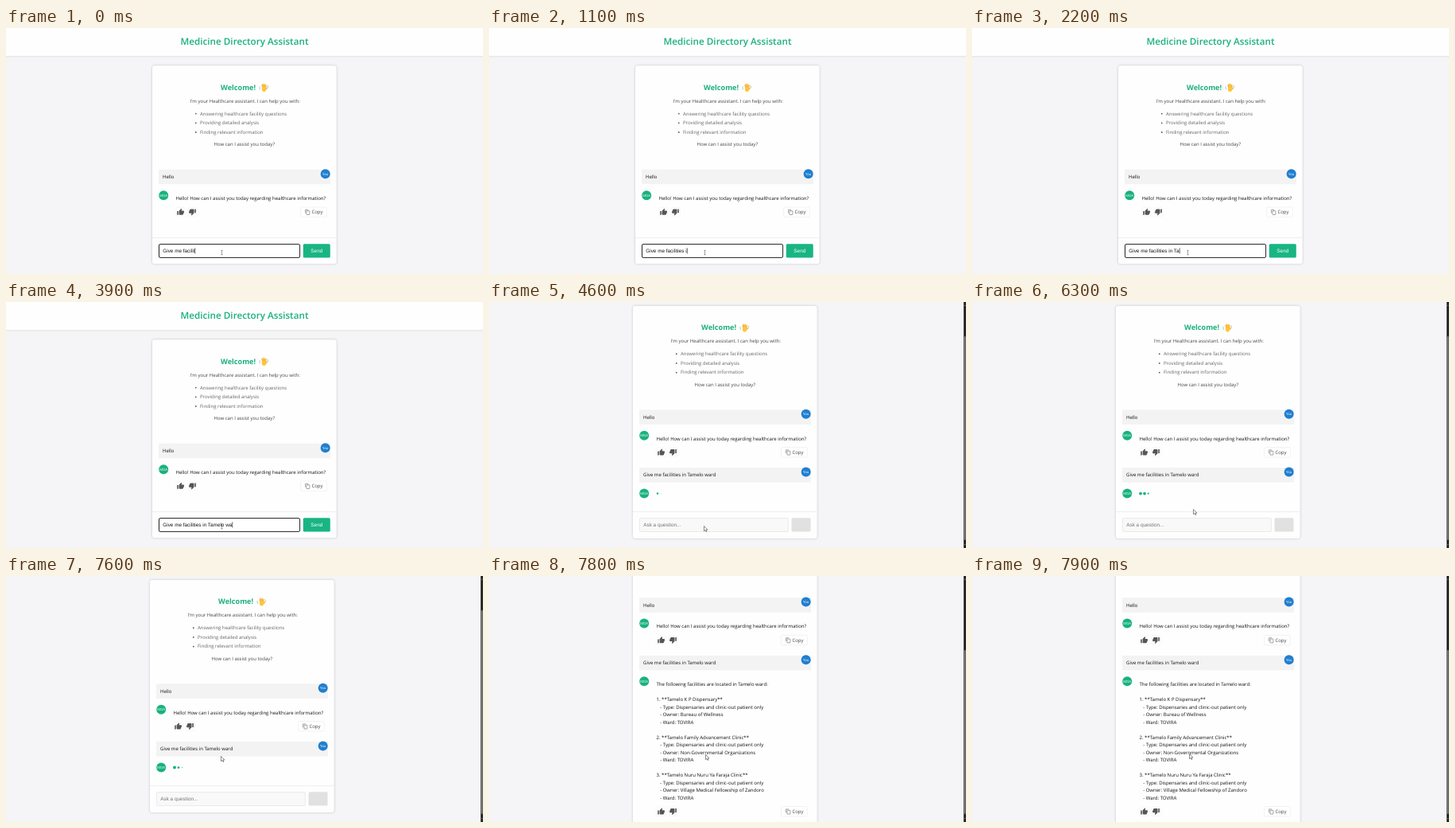
Animation of 600 by 309 pixels, one loop 8000 ms. Source, as an HTML page:

```html
<!DOCTYPE html>
<html lang="en">
<head>
<meta charset="utf-8">
<title>Chat assistant</title>
<style>
  html, body { margin: 0; width: 100%; height: 100%; overflow: hidden; background: #f5f4f6; }
  svg { display: block; width: 100vw; height: 100vh; }
  text { font: 6.03px "Open Sans", "Noto Sans", sans-serif; fill: #111; white-space: pre; text-rendering: geometricPrecision; }
  .mid { text-anchor: middle; }
  .title { font-size: 11.7px; font-weight: 600; fill: #1ab07c; }
  .welcome { font-size: 9.15px; font-weight: 700; fill: #1ab07c; }
  .soft { fill: #444; }
  .item { fill: #666; }
  .badge { font-size: 4.3px; fill: #fff; text-anchor: middle; }
  .form text { font: 6.38px "Liberation Sans", Arial, sans-serif; }
  .form .send { fill: #fff; text-anchor: middle; }
  .form .hint { fill: #757575; }
  .card { fill: #fefefe; filter: drop-shadow(0 .5px 1.5px #0003); }
</style>
</head>
<body>
<svg viewBox="0 0 600 309" preserveAspectRatio="none"></svg>
<script>
const LOOP = 8000, SENT = 4600, ANSWERED = 7700;
const question = "Give me facilities in Tamelo ward";
const typing = [[0, 15], [1000, 20], [1900, 22], [2200, 24], [3900, 31], [4300, 33]];
const pointerX = [[5500, 270.5], [6300, 278.5], [7200, 271], [7600, 270.5], [7900, 273.5]];
const pointerY = [[5500, 281.5], [6300, 260.5], [7200, 228], [7600, 226.5], [7900, 223.5]];

const clinic = (n, name, owner) =>
  ["", `${n}. **${name}**`, "   - Type: Dispensaries and clinic-out patient only", `   - Owner: ${owner}`, "   - Ward: TOVIRA"];
const answer = [
  "The following facilities are located in Tamelo ward:",
  ...clinic(1, "Tamelo K P Dispensary", "Bureau of Wellness"),
  ...clinic(2, "Tamelo Family Advancement Clinic", "Non-Governmental Organizations"),
  ...clinic(3, "Tamelo Nuru Nuru Ya Faraja Clinic", "Village Medical Fellowship of Zandoro")
];

const text = (x, y, s, cls = "") => `<text x="${x}" y="${y}" class="${cls}">${s}</text>`;
const rect = (x, y, w, h, fill, more = "") =>
  `<rect x="${x}" y="${y}" width="${w}" height="${h}" fill="${fill}" ${more}/>`;
const badge = (x, y, fill, s) => `<circle cx="${x}" cy="${y}" r="6" fill="${fill}"/>` + text(x, y + 1.6, s, "badge");
const userRow = (y, s) =>
  rect(192, y, 216, 18.5, "#f3f3f4") + text(197, y + 11.4, s) + badge(401.7, y + 5.4, "#1f7fcf", "You");
const bot = y => badge(198.2, y, "#18b27d", "MDA");
const thumb = `<path fill="#555" d="M1 21h4V9H1v12zm22-11c0-1.1-.9-2-2-2h-6.31l.95-4.57.03-.32c0-.41-.17-.79-.44-1.06L14.17 1 7.59 7.59C7.22 7.95 7 8.45 7 9v10c0 1.1.9 2 2 2h9c.83 0 1.54-.5 1.84-1.22l3.02-7.05c.09-.23.14-.47.14-.73v-2z"/>`;
const frame = (x, y) => rect(x, y, 11.4, 11.4, "none", 'rx="1.5" stroke="#f1f1f1" stroke-width=".6"');
const actions = y => `
  ${frame(214, y - 5.6)}${frame(229, y - 5.6)}
  <g transform="translate(214.8 ${y - 4.6}) scale(.4)">${thumb}</g>
  <g transform="translate(239.3 ${y + 4.9}) scale(-.4)">${thumb}</g>
  ${rect(370.7, y - 6, 32.6, 12.3, "#fff", 'rx="1.5" stroke="#e9e9e9" stroke-width=".6"')}
  <path d="M376.6 ${y + 1.6}v-4.3h3.6" fill="none" stroke="#666" stroke-width=".6"/>
  ${rect(378, y - 1.3, 3.9, 4.8, "none", 'rx=".4" stroke="#666" stroke-width=".6"')}
  ${text(384.4, y + 2.2, "Copy", "soft")}`;
const hand = `
  <g transform="translate(324 75) rotate(35)" fill="none" stroke-linecap="round">
    <path d="M-.6 1L-3.4-1.6M.2-.2L-3-3.3M1.4-1L-1.3-4.2M2.4-1.4L.6-4.2" stroke="#f9b93a" stroke-width="1.5"/>
    <path d="M3.3 1L3.9-2.4" stroke="#f9b93a" stroke-width="1.5"/>
    <ellipse cx="1.5" cy="1.3" rx="2.6" ry="3" fill="#fcc53f" transform="rotate(-40 1.5 1.3)"/>
    <path d="M-4.8 1.6Q-4.3 3.5-2.5 4.2M2.2-5.2Q3.6-5 4.3-3.9" stroke="#9aa5ad" stroke-width=".6"/>
  </g>`;
const list = ["Answering healthcare facility questions", "Providing detailed analysis", "Finding relevant information"]
  .map((s, i) => `<circle cx="238.8" cy="${107.6 + i * 11.7}" r=".9" fill="#555"/>` + text(244, 109.5 + i * 11.7, s, "item")).join("");

const svg = document.querySelector("svg");
svg.innerHTML = `
  ${rect(0, 0, 600, 309, "#f5f4f6")}
  <g id="page">
    <g id="header">
      ${rect(0, 0, 600, 36.5, "#e9e9ea")}${rect(0, 0, 600, 35, "#fefefe")}
      ${text(300, 21.3, "Medicine Directory Assistant", "title mid")}
    </g>
    <rect id="card" class="card" x="184" y="47.3" width="231.7" height="249" rx="3"/>
    ${text(270, 77.9, "Welcome!", "welcome")}${hand}
    ${text(231.5, 93.9, "I'm your Healthcare assistant. I can help you with:", "soft")}
    ${list}
    ${text(261.5, 148.2, "How can I assist you today?", "soft")}
    ${userRow(177.8, "Hello")}
    ${bot(210.2)}
    ${text(213.5, 216.1, "Hello! How can I assist you today regarding healthcare information?")}
    ${actions(231)}
    <g id="asked">${userRow(250.5, question)}${bot(282.9)}</g>
    <g id="dots" fill="#18b27d">${[215, 220, 224.7].map(x => `<circle cx="${x}" cy="283"/>`).join("")}</g>
    <g id="answer">
      ${answer.map((s, i) => s && text(213.5, 288.8 + i * 9.5, s)).join("")}
      ${actions(446.2)}
    </g>
  </g>
  <g id="compose" class="form">
    ${rect(184, 263.2, 231.7, .7, "#e9e9e9")}
    ${rect(192.5, 271.6, 177.1, 16.8, "#fff", 'rx="1.5" stroke="#222" stroke-width="1"')}
    <text id="typed" x="197.3" y="282.2"></text>
    <rect id="caret" y="276.3" width=".6" height="7.2"/>
    ${rect(373.8, 271.3, 34, 17.3, "#18b582", 'rx="1.5"')}
    ${text(390.8, 282.2, "Send", "send")}
    <path d="M270.4 279.4h2.2M270.4 284.8h2.2M271.5 279.4v5.4" fill="none" stroke="#444" stroke-width=".5"/>
  </g>
  <g id="waiting" class="form">
    ${rect(181, 263.2, 231.7, .7, "#e9e9e9")}
    ${rect(189.4, 271.6, 187, 16.8, "#f9f9f9", 'rx="1.5" stroke="#e3e3e3" stroke-width=".7"')}
    ${text(194.2, 282.2, "Ask a question...", "hint")}
    ${rect(380.6, 271.3, 24, 17.3, "#e1e1e1", 'rx="1.5"')}
  </g>
  <g id="scrollbar">
    ${rect(597, 0, 3, 309, "#2c2c2c")}
    <rect id="bar" x="597.8" width="1.6" rx=".8" fill="#999"/>
    <path d="M597.8 5l.8-1.4.8 1.4zM597.8 304l.8 1.4.8-1.4z" fill="#999"/>
  </g>
  <path id="pointer" d="M0 0V6.2L1.5 4.9 2.5 7 3.4 6.6 2.5 4.5H4.4Z" fill="#fff" stroke="#222" stroke-width=".5"/>`;

const el = id => document.getElementById(id);
const show = (id, on) => el(id).setAttribute("display", on ? "inline" : "none");
const set = (node, name, value) => node.setAttribute(name, value);

function track(points, t) {
  if (t <= points[0][0]) return points[0][1];
  for (let i = 1; i < points.length; i++) {
    const [t0, a] = points[i - 1], [t1, b] = points[i];
    if (t < t1) return a + (b - a) * (t - t0) / (t1 - t0);
  }
  return points[points.length - 1][1];
}

// Each dot grows for 40 % of its cycle, shrinks for 40 % and rests.
function dotScale(ms) {
  const p = ((ms % 1400) + 1400) % 1400 / 560;
  const x = Math.max(0, 1 - Math.abs(p - 1));
  return (1 - Math.cos(Math.PI * x)) / 2;
}

function draw(now) {
  const t = now % LOOP, sent = t >= SENT, answered = t >= ANSWERED;
  set(el("page"), "transform", answered ? "translate(-3 -150.6)" : sent ? "translate(-3 -42.4)" : "");
  set(el("card"), "height", answered ? 460 : sent ? 292 : 249);
  show("header", !sent);
  show("compose", !sent);
  show("asked", sent);
  show("waiting", sent && !answered);
  show("dots", sent && !answered);
  show("answer", answered);
  show("scrollbar", sent);
  show("pointer", sent);

  const typed = el("typed");
  typed.textContent = question.slice(0, Math.floor(track(typing, t) + 1e-6));
  if (!sent) set(el("caret"), "x", 197.5 + typed.getComputedTextLength());

  [...el("dots").children].forEach((dot, i) => set(dot, "r", 2 * dotScale(t - SENT + 320 - 160 * i)));
  const top = answered ? 93 : 43;
  set(el("bar"), "y", top);
  set(el("bar"), "height", 299 - top);
  set(el("pointer"), "transform", `translate(${track(pointerX, t)} ${track(pointerY, t)})`);
}

const start = performance.now();
function tick() {
  draw(performance.now() - start);
  requestAnimationFrame(tick);
}
tick();
</script>
</body>
</html>
```
